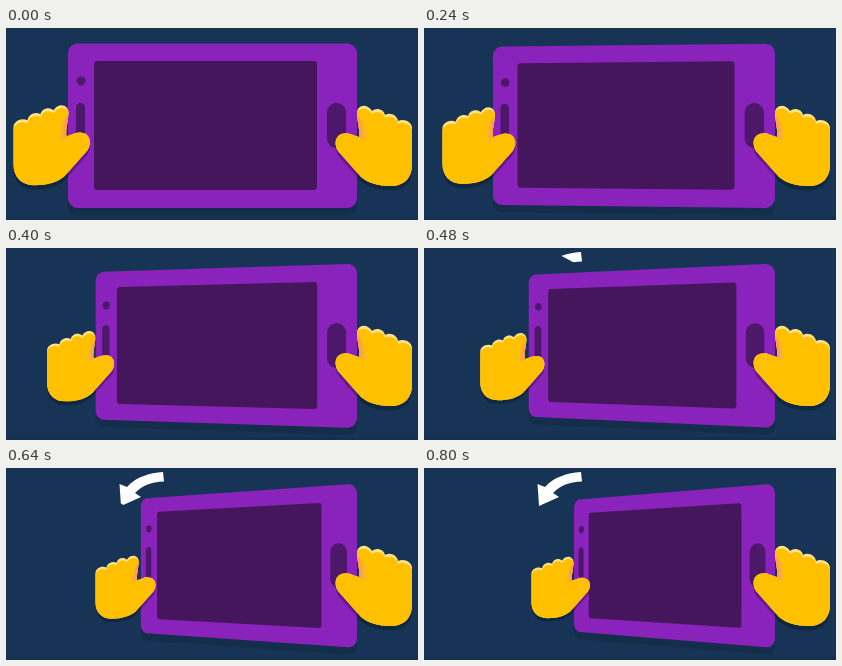
An HTML page for the animation above (1440 ms loop, 412 px wide and 192 px high).

```html
<!DOCTYPE html>
<html lang="en">
<head>
<meta charset="utf-8">
<title>Tilting phone</title>
<style>
html, body { margin: 0; width: 100%; height: 100%; overflow: hidden; background: #173456; }
svg { display: block; width: 100vw; height: 100vh; }
</style>
</head>
<body>
<svg viewBox="0 0 412 192">
  <defs>
    <clipPath id="wipe"><rect id="wipeBox" x="-500" y="-500" width="1000" transform="rotate(28.6)"/></clipPath>
    <linearGradient id="crease" x1="0" x2="1">
      <stop offset="0" stop-color="#ff8f5c"/>
      <stop offset="1" stop-color="#ffb92a"/>
    </linearGradient>
    <g id="hand">
      <path class="outline" fill="#000" fill-opacity=".27" transform="translate(0 4.500)"/>
      <path class="outline" fill="#ffe082"/>
      <path class="palm" fill="#ffc000"/>
      <path d="M351.500 88C352 96 354 102 353 109L358 113C361 107 359 96 351.500 88Z" fill="url(#crease)"/>
    </g>
  </defs>
  <rect width="412" height="192" fill="#173456"/>
  <rect y="189" width="412" height="3" fill="#152f4f"/>
  <g id="phone"></g>
  <path clip-path="url(#wipe)" fill="#fff"
    d="M157 4C143 5 130 9 121 19L113.500 16L115 38L135 29L129 25C135 18.500 145 13.500 158 13.500Z"/>
  <use href="#hand"/>
  <use id="left" href="#hand"/>
</svg>
<script>
const LOOP = 1440, STEP = 40, LAST = 800;
const PIVOT = 351, MIDDLE = 97.5, DEPTH = 770, VANISH = 145;
const $ = id => document.getElementById(id);

// Upper knuckles shift down by "drop" so a light rim stays visible.
function handPath(drop) {
  const y = v => v + drop;
  return `M351 86C350.5 ${y(79)} 357 ${y(76)} 362 ${y(79)}Q365 ${y(81)} 366 ${y(83)}` +
    `C370 ${y(79)} 378 ${y(81)} 379 ${y(87)}C384 ${y(84)} 391 ${y(87)} 392 ${y(93)}` +
    `C398 ${y(90)} 406 ${y(94)} 406 ${y(100)}L406 137C406 150 398 158 385 158` +
    'C372 158 362 155 355 149L332 123C327 115 330 106 338 105.5' +
    'C344 104.5 348 108 353 109C354 102 351.5 96 351 86Z';
}
document.querySelectorAll('.outline').forEach(p => p.setAttribute('d', handPath(0)));
document.querySelector('.palm').setAttribute('d', handPath(3));

// Rounded rectangle as a list of points, ready to be projected.
function roundRect(x, y, w, h, r) {
  const pts = [], n = 8;
  const corners = [[x + w - r, y + h - r], [x + r, y + h - r], [x + r, y + r], [x + w - r, y + r]];
  corners.forEach(([cx, cy], q) => {
    for (let i = 0; i <= n; i++) {
      const a = (q + i / n) * Math.PI / 2;
      pts.push([cx + r * Math.cos(a), cy + r * Math.sin(a)]);
    }
  });
  return pts;
}

const body = roundRect(62, 15.6, 289, 164.4, 10);
const parts = [
  [body, '#142d4b', 7.5],
  [body, '#8923bc', 0],
  [roundRect(88, 33, 223, 129, 3), '#46165d', 0],
  [roundRect(70.5, 48.5, 9, 9, 4.5), '#4d1869', 0],
  [roundRect(70, 75, 9, 38, 4.5), '#4d1869', 0],
  [roundRect(321, 75, 19, 45, 9.5), '#4d1869', 0]
].map(([pts, fill, drop]) => {
  const node = document.createElementNS('http://www.w3.org/2000/svg', 'polygon');
  node.setAttribute('fill', fill);
  $('phone').append(node);
  return { pts, drop, node };
});

// Turn around the right edge, seen from the middle of the stage.
function project([x, y], angle) {
  const u = PIVOT - x, k = Math.sin(angle) / DEPTH, w = 1 + k * u;
  return [PIVOT - u * (Math.cos(angle) + VANISH * k) / w, MIDDLE + (y - MIDDLE) / w];
}

// Small slide of the left hand along the edge it holds.
const drift = [[0, 0], [160, 2], [320, 2.5], [480, 0], [560, 0], [640, 1], [800, 3]];
function keyed(keys, t) {
  const i = Math.max(1, keys.findIndex(k => k[0] >= t));
  const [t0, a] = keys[i - 1], [t1, b] = keys[i];
  return a + (b - a) * (t - t0) / (t1 - t0);
}

function draw(ms) {
  const t = Math.min(LAST, Math.floor(ms / STEP) * STEP);
  const s = Math.min(1, Math.max(0, (t - 50) / 770));
  const ease = (1 - Math.cos(Math.PI * s)) / 2;
  const angle = ease * 42 * Math.PI / 180;

  for (const { pts, drop, node } of parts) {
    node.setAttribute('points', pts.map(p => {
      const [x, y] = project(p, angle);
      return x.toFixed(2) + ',' + (y + drop).toFixed(2);
    }).join(' '));
  }

  const size = 1 / (1 + 0.455 * Math.sin(angle));
  const x = project([62, MIDDLE], angle)[0] - 16.5 + keyed(drift, t);
  const y = 117.3 + 2.2 * ease;
  $('left').setAttribute('transform', `translate(${x} ${y}) scale(${-size} ${size}) translate(-368 -118)`);

  $('wipeBox').setAttribute('height', 427 + Math.max(0, t - 416) * 0.22);
}

const start = performance.now();
function tick() {
  draw((performance.now() - start) % LOOP);
  requestAnimationFrame(tick);
}
tick();
</script>
</body>
</html>
```
